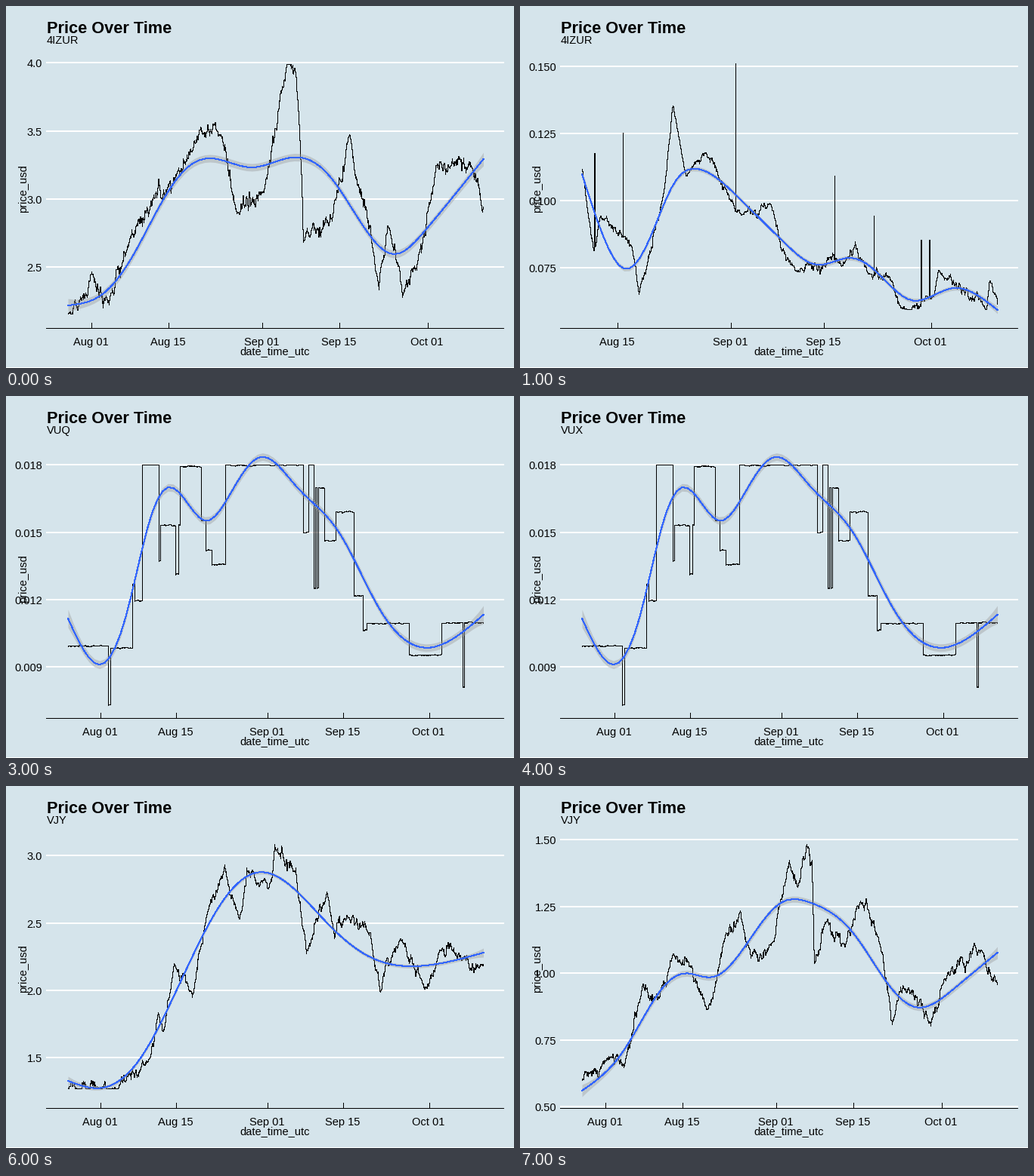
A matplotlib script that plays this animation: 672 by 480 pixels, repeating every 8 s.

```python
import numpy as np
import matplotlib.pyplot as plt
from matplotlib.animation import FuncAnimation

plt.rcParams["font.family"] = "Liberation Sans"
plt.rcParams["path.simplify"] = False

W, H, DPI = 672, 480, 96
PX = 72 / DPI  # points per pixel
LEFT, RIGHT, BOTTOM = 54, 658, 427.5
X0, X1 = 82, 631.5
BG, BLUE = "#d5e4eb", "#3366ff"
NAMES = ["4IZUR", "VUQ", "VUX", "VJY"]
DATES = {"Aug 01": 0, "Aug 15": 14, "Sep 01": 31, "Sep 15": 45, "Oct 01": 61}

# days: x of the first of August, pixels per day
# scale: top value, value step, decimals; rows: top y, y step, count
# turns: main turning points of the price; trend: knots of the smooth curve
CHARTS = [
    dict(
        days=(113, 7.295), scale=(4, 0.5, 1), rows=(75.4, 90.3, 4),
        rough=11, band=(5, 9),
        turns=[(82, 408), (114, 356), (136, 396), (162, 318), (195, 250), (225, 225),
               (257, 160), (284, 172), (304, 268), (340, 245), (372, 77), (386, 130),
               (393, 313), (431, 285), (454, 170), (493, 376), (506, 294), (524, 386),
               (543, 350), (570, 214), (616, 214), (631.5, 266)],
        trend=[(82, 397), (125, 384), (165, 336), (205, 262), (240, 214), (268, 202),
               (325, 214), (383, 200.5), (425, 222), (470, 288), (512, 329), (555, 297),
               (631.5, 203)],
    ),
    dict(
        days=(5.5, 8.82), scale=(0.15, 0.025, 3), rows=(80, 89, 4),
        rough=6, band=(3, 5),
        turns=[(82, 216), (97, 324), (106, 278), (148, 320), (157, 382), (190, 245),
               (202, 132), (219, 225), (246, 196), (284, 272), (331, 262), (345, 322),
               (366, 352), (435, 335), (443, 312), (460, 355), (488, 358), (503, 400),
               (546, 384), (553, 350), (617, 402), (621, 364), (631.5, 395)],
        spikes=[(98.5, 195), (136, 168), (285, 76), (416, 225), (468, 278),
                (530.5, 310), (541.5, 310)],
        trend=[(82, 223), (110, 305), (138, 348.5), (170, 312), (205, 233), (235, 216),
               (290, 255), (350, 314), (392, 343), (437, 334), (470, 351), (517, 390),
               (573, 374), (631.5, 403)],
    ),
    dict(
        days=(125.4, 7.125), scale=(0.018, 0.003, 3), rows=(91.4, 89.3, 4),
        rough=0.8, band=(5, 12), hold=True,
        turns=[(82, 332), (135, 410), (138, 335), (167, 250), (170, 272), (180, 91),
               (202, 219), (204, 172), (224, 237), (228, 171), (230, 94), (258, 165),
               (264, 205), (272, 224), (290, 92), (393, 181), (400, 91), (407, 255),
               (409, 122), (411, 255), (413, 122), (421, 192), (436, 154), (460, 265),
               (472, 311), (477, 302), (533, 343), (576, 301), (604, 386), (606, 301),
               (631.5, 330)],
        trend=[(82, 295), (126, 356), (160, 287), (190, 165), (215, 121), (264, 165.5),
               (300, 124), (336, 81), (385, 121), (440, 180), (495, 284), (548, 333),
               (631.5, 290)],
    ),
    dict(
        days=(125, 7.13), scale=(3, 0.5, 1), rows=(92.4, 89.3, 4),
        rough=8, band=(2.5, 6),
        turns=[(82, 400), (140, 401), (190, 360), (201, 300), (208, 322), (222, 235),
               (246, 280), (264, 178), (289, 104), (308, 176), (318, 108), (347, 135),
               (355, 77), (383, 108), (397, 222), (424, 140), (434, 202), (452, 175),
               (480, 198), (495, 273), (521, 202), (551, 262), (573, 217), (606, 225),
               (631.5, 236)],
        trend=[(82, 391), (125, 400.5), (175, 365), (225, 272), (285, 155),
               (333, 114.5), (385, 140), (430, 187), (480, 226), (550, 238.5),
               (631.5, 221)],
    ),
    dict(
        days=(113, 7.295), scale=(1.5, 0.25, 2), rows=(71.2, 88.5, 5),
        rough=8, band=(4, 8),
        turns=[(82, 390), (120, 358), (137, 373), (162, 262), (184, 280), (202, 222),
               (225, 240), (248, 296), (270, 206), (291, 165), (305, 228), (335, 205),
               (341, 160), (356, 98), (367, 134), (379, 77), (386, 98), (389, 235),
               (404, 182), (430, 212), (450, 152), (474, 202), (492, 316), (506, 264),
               (543, 318), (563, 258), (610, 218), (631.5, 262)],
        trend=[(82, 404), (135, 354), (190, 266), (217, 248.5), (257, 253), (305, 202),
               (345, 155), (385, 155), (440, 194), (480, 253), (522, 293), (575, 268),
               (631.5, 221)],
    ),
]


def spline(knots, x):
    """Natural cubic spline through the knots."""
    kx, ky = np.array(knots, float).T
    h, n = np.diff(kx), len(kx)
    slope = np.diff(ky) / h
    mat, rhs = np.eye(n), np.zeros(n)
    for k in range(1, n - 1):
        mat[k, k - 1:k + 2] = h[k - 1], 2 * (h[k - 1] + h[k]), h[k]
        rhs[k] = 6 * (slope[k] - slope[k - 1])
    m = np.linalg.solve(mat, rhs)
    k = np.clip(np.searchsorted(kx, x) - 1, 0, n - 2)
    a, b, s = kx[k + 1] - x, x - kx[k], h[k]
    return ((m[k] * a**3 + m[k + 1] * b**3) / (6 * s)
            + (ky[k] / s - m[k] * s / 6) * a
            + (ky[k + 1] / s - m[k + 1] * s / 6) * b)


def drift(rng, n, keep):
    """Noise of unit spread in which each step keeps a share of the last."""
    out = np.zeros(n)
    for i in range(1, n):
        out[i] = keep * out[i - 1] + np.sqrt(1 - keep**2) * rng.normal()
    return out


def price_path(chart, seed):
    """Join the turning points and add noise that fades out at each of them."""
    rng = np.random.default_rng(seed)
    kx, ky = np.array(chart["turns"], float).T
    x = np.union1d(np.linspace(X0, X1, 1100), kx)
    k = np.clip(np.searchsorted(kx, x, "right") - 1, 0, len(kx) - 2)
    t = (x - kx[k]) / (kx[k + 1] - kx[k])
    y = ky[k] if chart.get("hold") else np.interp(x, kx, ky)
    noise = 0.6 * drift(rng, len(x), 0.8) + 0.7 * drift(rng, len(x), 0.96)
    y = y + chart["rough"] * noise * np.sqrt(4 * t * (1 - t))
    y = np.clip(y, ky.min(), ky.max())
    for sx, sy in chart.get("spikes", []):
        y[np.argmin(abs(x - sx))] = sy
    return np.floor(x) + 0.5, np.floor(y) + 0.5


fig = plt.figure(figsize=(W / DPI, H / DPI), dpi=DPI, facecolor=BG)
ax = fig.add_axes([0, 0, 1, 1])
ax.set(xlim=(0, W), ylim=(H, 0))
ax.axis("off")


def stroke(x, y, color, width, z, **kw):
    return ax.plot(x, y, color=color, lw=width * PX, antialiased=False, zorder=z, **kw)[0]


def hairline(x, y, z, color="black"):
    """Crisp line one pixel wide, for points on pixel centres."""
    return stroke(x, y, color, 0.4, z, snap=False, drawstyle="steps-post")


def label(x, y, s, ha="left", size=14.6, **kw):
    return ax.text(x, y, s, ha=ha, va="baseline", fontsize=size * PX, zorder=6, **kw)


def build(chart, seed):
    parts = []
    top, step, digits = chart["scale"]
    y0, dy, count = chart["rows"]
    for i in range(count):
        y = round(y0 + i * dy)
        parts.append(stroke([LEFT, RIGHT], [y, y], "white", 2, 1))
        parts.append(label(48, y + 6, f"{top - i * step:.{digits}f}", "right"))
    aug, per_day = chart["days"]
    for s, day in DATES.items():
        x = round(aug + day * per_day)
        if x > LEFT:
            parts.append(hairline([x + 0.5] * 2, [420.5, BOTTOM], 5))
            parts.append(label(x - 1, 450, s, "center"))
    parts.append(hairline(*price_path(chart, seed), 2))
    x = np.linspace(X0, X1, 80)
    y = spline(chart["trend"], x)
    mid, edge = chart["band"]
    half = mid + (edge - mid) * np.exp(-np.minimum(x - X0, X1 - x) / 12)
    parts.append(ax.fill_between(x, y - half, y + half, color="#999999", alpha=0.4,
                                 lw=0, antialiased=False, zorder=3))
    parts.append(stroke(x, y, BLUE, 1, 4, snap=False))
    return parts


charts = [build(c, seed) for seed, c in enumerate(CHARTS)]
hairline([LEFT, RIGHT], [BOTTOM] * 2, 5)
hairline([0, W], [H - 0.5] * 2, 5, "white")
label(54, 36, "Price Over Time", size=21.7, weight="bold")
name = label(54, 50, "")
label(355.5, 462, "date_time_utc", "center")
ax.text(23.5, 242, "price_usd", rotation=90, ha="center", va="center",
        fontsize=14.6 * PX, zorder=6)


def update(i):
    # The chart and its subtitle take turns changing, one step each.
    name.set_text(NAMES[i // 2])
    for k, parts in enumerate(charts):
        for part in parts:
            part.set_visible(k == (i + 1) // 2)
    return []


anim = FuncAnimation(fig, update, frames=8, interval=1000, repeat=True, repeat_delay=0)
plt.show()
```
